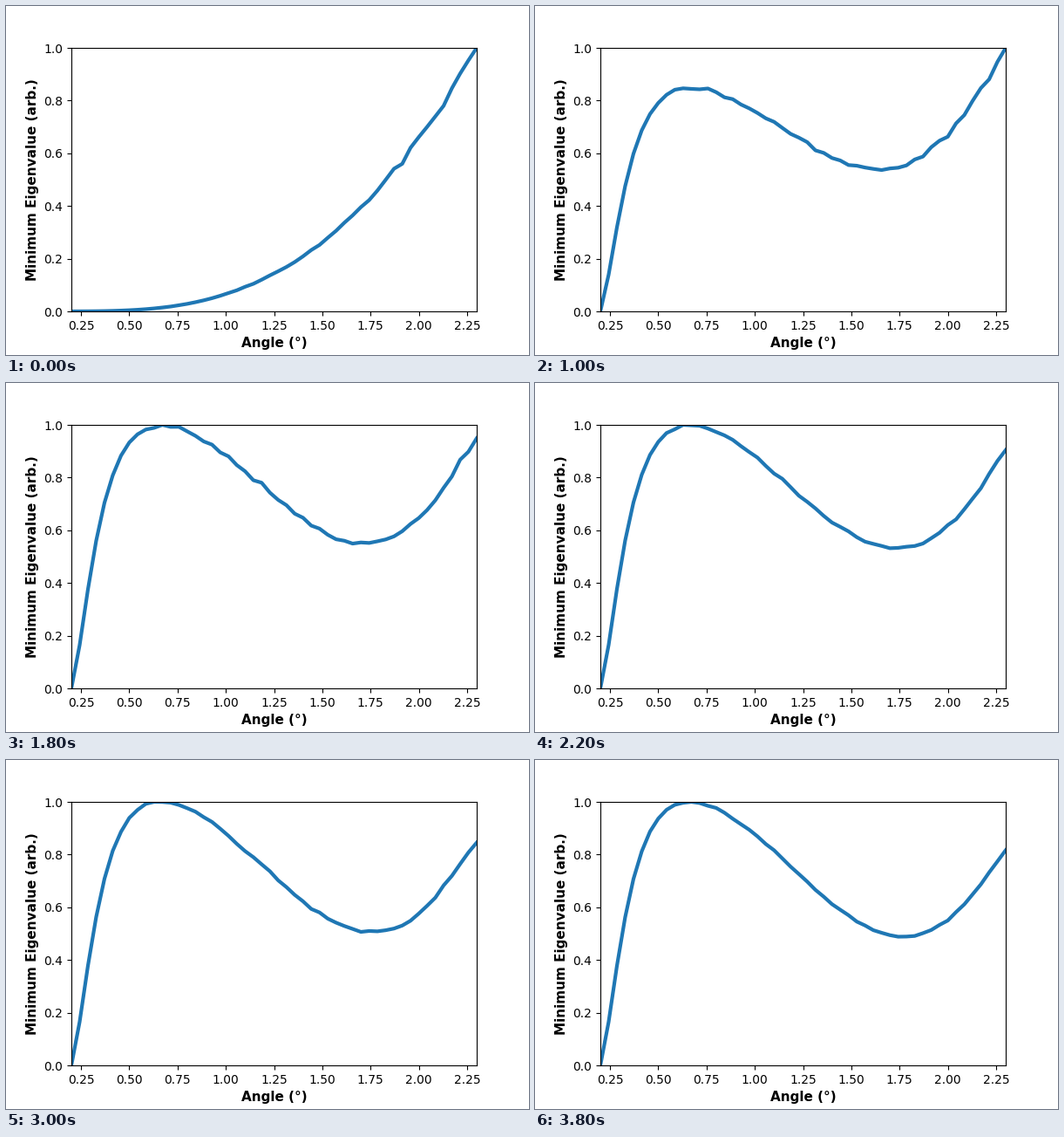
Write a matplotlib script that moves like this. It is 600 by 400 pixels and loops after 4 s.

```python
import numpy as np
import matplotlib.pyplot as plt
from matplotlib.animation import FuncAnimation

FRAMES, STEP_MS = 20, 200
LOW, HIGH = 0.2, 2.3

# Snap kerning to whole pixels, as older text layout does.
plt.rcParams["text.kerning_factor"] = 6

angle = np.linspace(LOW, HIGH, 50)


def power_law():
    """Steep background, slightly flatter towards the high end."""
    log = np.log(HIGH / angle)
    return np.exp(-log * (2.9 + 0.42 * log))


def hump():
    """Fast rise from the lowest angle, then a slow cosine fall."""
    u = angle - LOW
    rise = np.tanh(5.35 * u) * (1 - 0.6 * np.exp(-u / 0.04))
    fall = np.cos(np.minimum(angle - 0.55, np.pi / 2)) ** 2
    return rise * fall


BACKGROUND, HUMP = power_law(), hump()


def curve(step):
    # The hump saturates with step while the measurement noise dies away.
    height = step / (2.5 + 0.67 * step)
    y = BACKGROUND + height * HUMP
    ramp = np.clip((angle - LOW) / 1.2, 0, 1)
    rng = np.random.default_rng(step)
    y *= 1 + 0.013 * np.exp(-step / 15) * ramp * rng.normal(size=angle.size)
    return y / y.max()


fig, ax = plt.subplots(figsize=(6, 4), dpi=100)
fig.subplots_adjust(left=0.125, right=0.9, bottom=0.125, top=0.88)
line, = ax.plot(angle, curve(0), color="#1f77b4", lw=3)
ax.set_xlim(LOW, HIGH)
ax.set_ylim(0, 1)
label = dict(fontsize=11, fontweight="bold")
ax.set_xlabel("Angle (°)", **label)
ax.set_ylabel("Minimum Eigenvalue (arb.)", **label)


def update(step):
    line.set_ydata(curve(step))
    return line,


anim = FuncAnimation(fig, update, frames=FRAMES, interval=STEP_MS,
                     repeat=True, repeat_delay=0)
plt.show()
```
